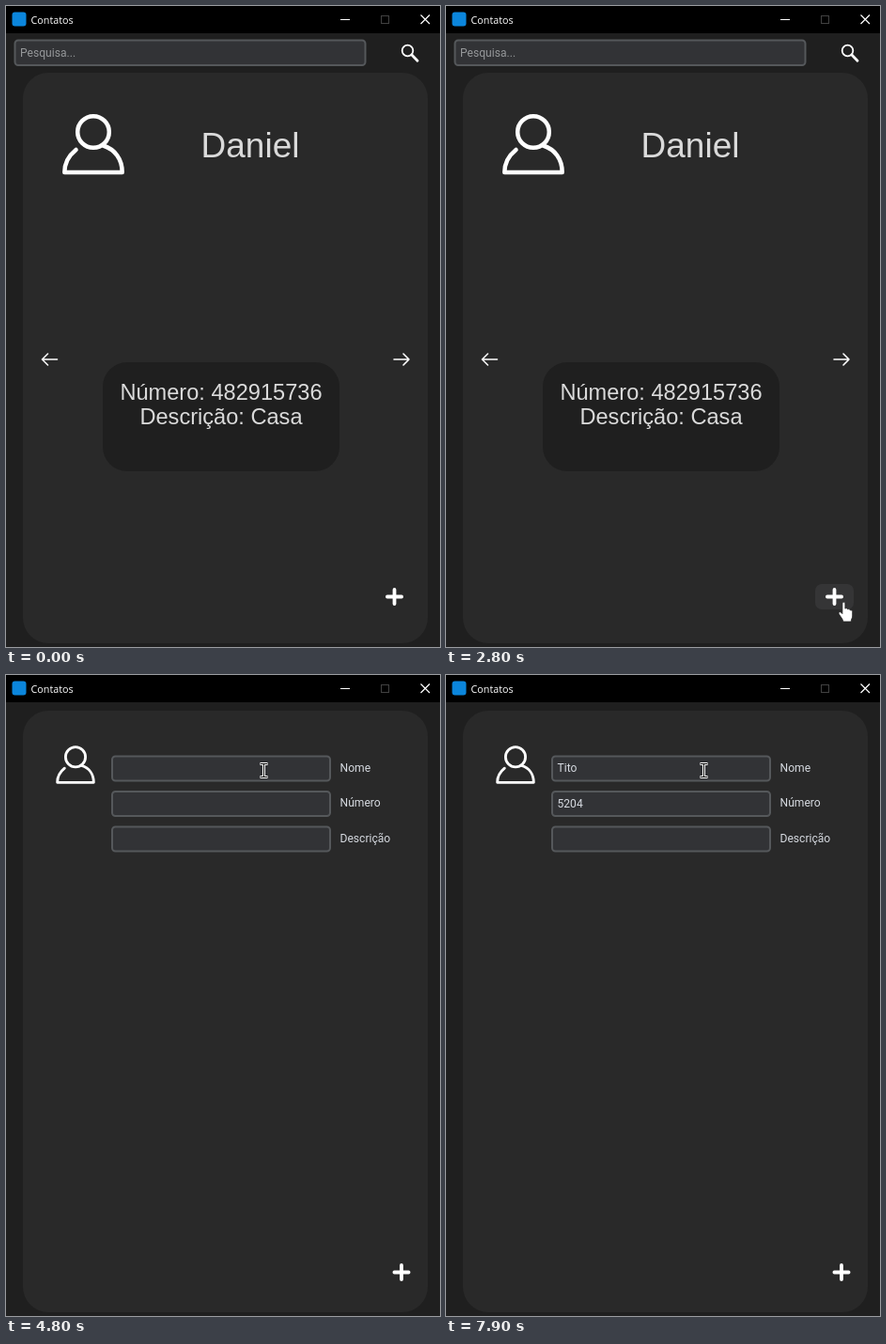
These frames come from a looping animation (462x682 px, 8000 ms). An HTML page:

```html
<!DOCTYPE html>
<html lang="pt">
<head>
<meta charset="utf-8">
<title>Contatos</title>
<style>
html, body { margin: 0; width: 100%; height: 100%; overflow: hidden; background: #1f1f1f; }
svg { display: block; width: 462px; height: 682px; }
.ui { font: 12.1px Roboto, sans-serif; fill: #d6dae0; }
.big { font-family: "Liberation Sans", sans-serif; fill: #dadada; text-anchor: middle; }
.line { fill: none; stroke: #fff; stroke-linecap: round; stroke-linejoin: round; }
.entry { fill: #323336; stroke: #55585b; stroke-width: 2; }
.card { fill: #292929; }
.hover { fill: #353536; }
</style>
</head>
<body>
<svg viewBox="0 0 462 682">
  <defs>
    <g id="person" class="line" stroke-width="4.5">
      <circle cx="93" cy="134" r="16.8"/>
      <path d="M74.5 153C67 159 62.3 167 62.3 177H123.7C123.7 163 116 152.500 103.500 148.500"/>
    </g>
    <path id="plus" class="line" stroke-width="3.8" d="M-7.600 0H7.600M0 -7.600V7.600"/>
  </defs>

  <rect width="462" height="682" fill="#1f1f1f"/>
  <rect width="462" height="29" fill="#000"/>
  <rect x="6.500" y="6.500" width="15" height="15" rx="3" fill="#0b86dc"/>
  <text x="26.500" y="18.500" fill="#fff" style="font:10.8px 'Open Sans',sans-serif">Contatos</text>
  <path d="M356 14.500H366" stroke="#fff"/>
  <rect x="399.500" y="10.500" width="8" height="8" fill="none" stroke="#414141"/>
  <path d="M441.500 9.500L451 19M451 9.500L441.500 19" stroke="#fff" stroke-width="1.2"/>

  <g id="list">
    <rect class="entry" x="9.500" y="36.500" width="373" height="26.500" rx="3.500"/>
    <text class="ui" x="15" y="53.500" style="fill:#96989a">Pesquisa...</text>
    <circle class="line" cx="427.500" cy="47.500" r="5.800" stroke-width="1.8"/>
    <path class="line" d="M432 52L438 58.200" stroke-width="2.8"/>
    <rect class="card" x="18" y="71" width="431" height="607" rx="27"/>
    <use href="#person"/>
    <text class="big" x="260" y="161" font-size="37">Daniel</text>
    <path class="line" stroke-width="1.6" d="M54.500 376H38.500M44.500 370L38.500 376L44.500 382"/>
    <path class="line" stroke-width="1.6" d="M413 376H429M423 370L429 376L423 382"/>
    <rect x="103" y="379" width="252" height="116" rx="26" fill="#1f1f1f"/>
    <text class="big" x="229" y="419" font-size="23.6">Número: 482915736</text>
    <text class="big" x="229" y="445" font-size="23.6">Descrição: Casa</text>
    <rect class="hover" x="393" y="615" width="41" height="27" rx="7"/>
    <use href="#plus" x="413.500" y="628.500"/>
  </g>

  <g id="form">
    <rect class="card" x="18" y="38" width="431" height="640" rx="27"/>
    <use href="#person" transform="translate(15.400 2.800) scale(.63)"/>
    <g id="fields"></g>
    <rect class="hover" x="393" y="620" width="56" height="32" rx="14"/>
    <use href="#plus" x="421" y="635.500"/>
  </g>

  <g id="mouse">
    <path id="arrow" d="M.5 .5V14.800L3.800 11.800L6.200 17.300L8.500 16.300L6.100 10.900H10.600Z" fill="#111" stroke="#fff" stroke-width="1.100"/>
    <path id="hand" d="M-1.600 0.700C-1.600 -1.200 1.400 -1.200 1.400 .7V6.200C2.300 5.300 4 5.700 4.200 6.900C5.200 6.200 6.700 6.800 6.900 8C8.200 7.500 9.200 8.300 9.200 9.700V14C9.200 16 7.900 17 7.700 20H-.7C-.9 17.500 -3.500 14.800 -5.200 12C-6.300 10.100 -4.300 8.900 -2.900 10.300L-1.600 11.600Z" fill="#fff" stroke="#222" stroke-width=".8"/>
    <g id="beam" fill="none">
      <path d="M-4 -7H4M-4 7H4M0 -7V7" stroke="#fff" stroke-width="3"/>
      <path d="M-3.500 -7H3.500M-3.500 7H3.500M0 -7V7" stroke="#111" stroke-width="1"/>
    </g>
  </g>
</svg>
<script>
const LOOP = 8000, STEP = 100, FORM_AT = 3000;
const $ = id => document.getElementById(id);
const show = (el, on) => el.setAttribute('visibility', on ? 'visible' : 'hidden');

// time, x, y of the pointer
const path = [
  [1500, 446.5, 663], [1600, 440.5, 663], [1700, 440.5, 663],
  [2100, 426, 638], [2200, 426, 638], [2600, 423.5, 635], [3100, 423.5, 635],
  [3200, 421, 612], [3300, 406, 545], [3400, 376, 420], [3500, 336, 290],
  [3600, 300, 190], [3700, 277, 132], [3800, 270, 114], [4000, 274.5, 101.5]
];

const labels = ['Nome', 'Número', 'Descrição'];
const fieldY = i => 86.5 + i * 37.5;
$('fields').innerHTML = labels.map((label, i) => {
  const y = fieldY(i);
  return `<rect class="entry" x="113" y="${y}" width="232" height="26" rx="3.5"/>
    <text class="ui" x="355.5" y="${y + 16}">${label}</text>
    <text class="ui value" x="118.500" y="${y + 16.5}"></text>
    <rect class="caret" y="${y + 5.5}" width="1.500" height="14.500" fill="#dce4ee"/>`;
}).join('');
const values = document.querySelectorAll('.value');
const carets = document.querySelectorAll('.caret');
const hovers = document.querySelectorAll('.hover');

// focus interval and key press times of each field
const typing = [
  { text: 'Tito', keys: [4900, 5200, 5500, 5600], from: 4200, to: 6400 },
  { text: '5204', keys: [7500, 7600, 7700, 7800], from: 6400, to: LOOP },
  { text: '', keys: [], from: LOOP, to: LOOP }
];

function pointer(t) {
  const n = path.findIndex(p => p[0] > t);
  if (n < 0) return path[path.length - 1].slice(1);
  const [t0, x0, y0] = path[Math.max(n - 1, 0)], [t1, x1, y1] = path[n];
  const k = t1 > t0 ? (t - t0) / (t1 - t0) : 0;
  return [x0 + (x1 - x0) * k, y0 + (y1 - y0) * k];
}

const inside = (x, y, l, t, r, b) => x >= l && x <= r && y >= t && y <= b;

function draw(t) {
  const form = t >= FORM_AT;
  $('list').style.display = form ? 'none' : '';
  $('form').style.display = form ? '' : 'none';

  const [x, y] = pointer(t), moving = t >= path[0][0];
  const onPlus = moving && (form ? inside(x, y, 393, 620, 449, 652) : inside(x, y, 393, 615, 434, 642));
  const onField = form && labels.some((_, i) => inside(x, y, 112, fieldY(i) - 1, 346, fieldY(i) + 27));
  $('mouse').setAttribute('transform', `translate(${x} ${y})`);
  $('mouse').style.display = moving ? '' : 'none';
  show($('hand'), onPlus);
  show($('beam'), onField);
  show($('arrow'), !onPlus && !onField);
  hovers.forEach(h => show(h, onPlus));

  typing.forEach((f, i) => {
    const text = f.text.slice(0, f.keys.filter(k => t >= k).length);
    values[i].textContent = text;
    const lit = form && t >= f.from && t < f.to && (t - f.from) % 900 < 600;
    show(carets[i], lit);
    if (lit) carets[i].setAttribute('x', 117.5 + (text ? values[i].getComputedTextLength() : 0));
  });
}

function tick() {
  const t = performance.now() % LOOP;
  draw(Math.floor(t / STEP) * STEP);
  requestAnimationFrame(tick);
}
tick();
</script>
</body>
</html>
```
